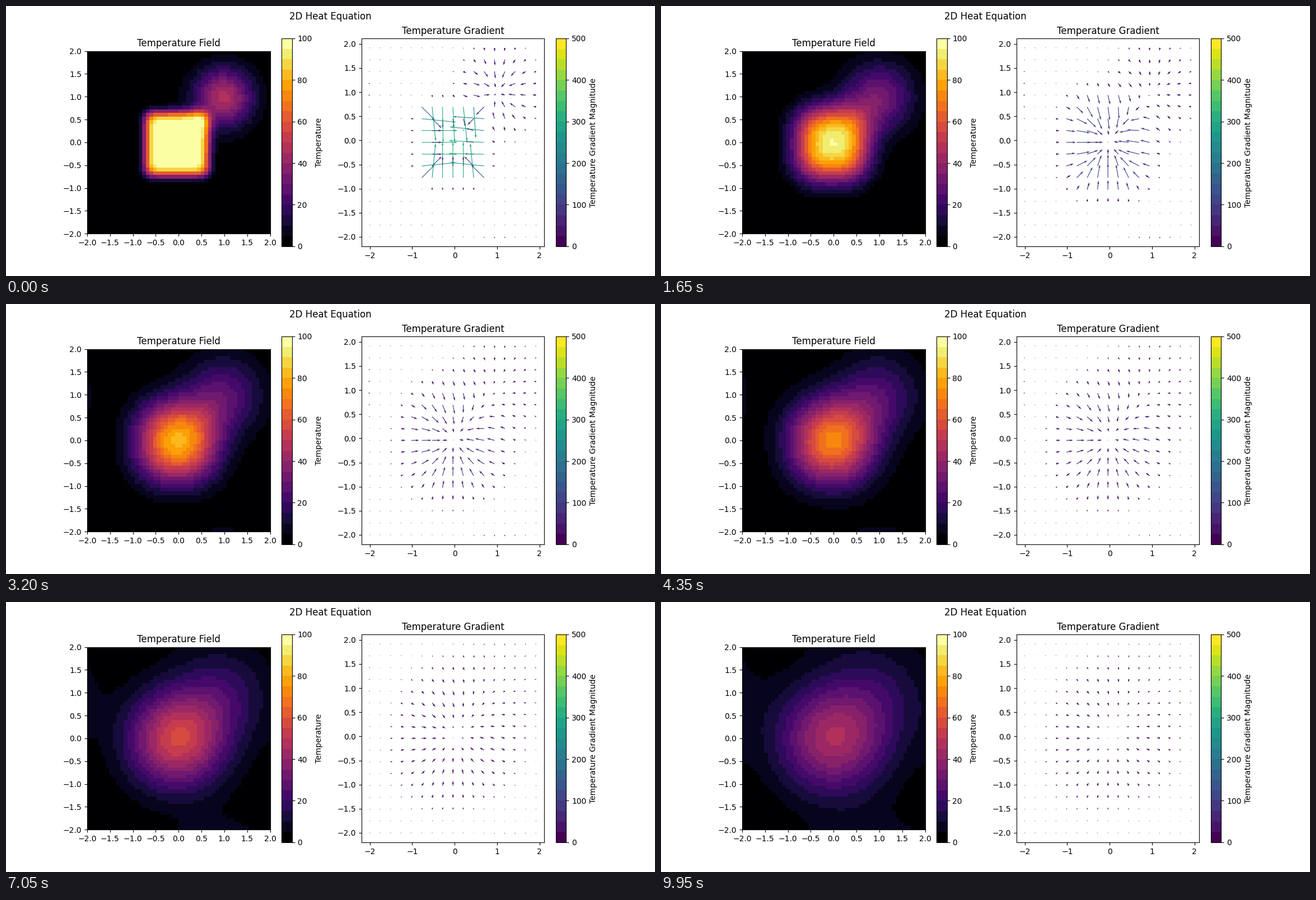
Write a matplotlib script that moves like this. It is 1159 px wide and 483 px high and loops after 10000 ms.

```python
import numpy as np
import matplotlib.pyplot as plt
from matplotlib.animation import FuncAnimation

N = 50            # grid points per side
FRAMES = 200
RATE = 0.2        # diffusivity * dt / dx^2
LEAD_STEPS = 5    # diffusion steps taken before the first picture
STRIDE = 3        # one arrow for every third grid point

axis = np.linspace(-2, 2, N)
dx = axis[1] - axis[0]
X, Y = np.meshgrid(axis, axis)


def initial_field():
    """A hot square plus a softer Gaussian bump."""
    field = 50 * np.exp(-((X - 1) ** 2 + (Y - 1) ** 2) / 0.4)
    field[N // 3:2 * N // 3, N // 3:2 * N // 3] += 100
    return field


def diffuse(field):
    """One explicit heat-equation step with periodic edges."""
    neighbours = sum(np.roll(field, shift, ax) for shift in (-1, 1) for ax in (0, 1))
    return field + RATE * (neighbours - 4 * field)


def gradient(field):
    gy, gx = np.gradient(field, dx)
    gx, gy = gx[::STRIDE, ::STRIDE], gy[::STRIDE, ::STRIDE]
    return gx, gy, np.hypot(gx, gy)


states = [initial_field()]
for _ in range(LEAD_STEPS + FRAMES):
    states.append(diffuse(states[-1]))

gx, gy, magnitude = gradient(states[0])
arrow_scale = 1.8 * magnitude.mean() * np.sqrt(magnitude.size)

plt.rcParams["font.family"] = "DejaVu Sans"
fig, (ax_field, ax_grad) = plt.subplots(1, 2, figsize=(11.59, 4.83), dpi=100)
heading = fig.suptitle("2D Heat Equation")

image = ax_field.imshow(states[LEAD_STEPS], cmap=plt.get_cmap("inferno", 20),
                        interpolation="nearest", vmin=0, vmax=100,
                        origin="lower", extent=(-2, 2, -2, 2))
ax_field.set_title("Temperature Field")
ax_field.set_xticks(np.arange(-2, 2.1, 0.5))
ax_field.set_yticks(np.arange(-2, 2.1, 0.5))
field_bar = fig.colorbar(image, ax=ax_field, label="Temperature")

arrows = ax_grad.quiver(X[::STRIDE, ::STRIDE], Y[::STRIDE, ::STRIDE], gx, gy, magnitude,
                        cmap=plt.get_cmap("viridis", 20), scale=arrow_scale)
arrows.set_clim(0, 500)
ax_grad.set_title("Temperature Gradient")
grad_bar = fig.colorbar(arrows, ax=ax_grad, label="Temperature Gradient Magnitude")


def freeze_static_parts():
    """Render labels, ticks and colour bars once and reuse them as a backdrop."""
    moving = (image, arrows)
    for artist in moving:
        artist.set_visible(False)
    fig.canvas.draw()
    backdrop = np.array(fig.canvas.buffer_rgba())
    for artist in moving:
        artist.set_visible(True)
    for artist in (heading, ax_field.title, ax_grad.title, ax_field.xaxis,
                   ax_field.yaxis, ax_field.patch, field_bar.ax, grad_bar.ax):
        artist.set_visible(False)
    ax_grad.set_axis_off()
    fig.figimage(backdrop, origin="upper", zorder=-1)


freeze_static_parts()


def update(frame):
    field = states[LEAD_STEPS + frame]
    image.set_data(field)
    arrows.set_UVC(*gradient(field))
    return image, arrows


anim = FuncAnimation(fig, update, frames=FRAMES, interval=50, repeat=True, repeat_delay=0)
plt.show()
```
